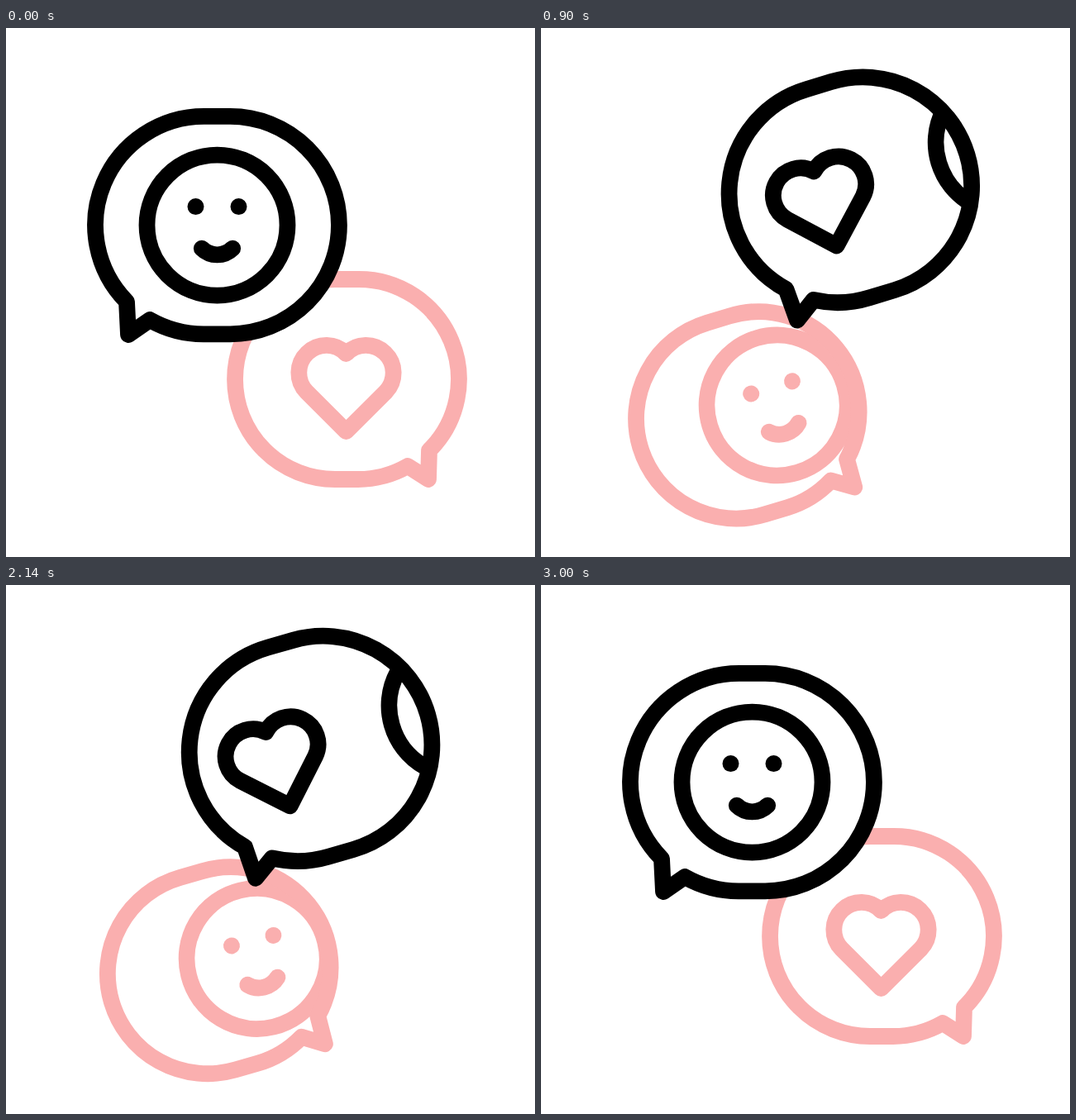
Recreate the animation shown at these times as an HTML page. Size 640 px wide and 640 px high, loop 3020 ms.

```html
<!DOCTYPE html>
<html lang="en">
<head>
<meta charset="utf-8">
<title>Chat bubbles</title>
<style>
  html, body { margin: 0; width: 100%; height: 100%; overflow: hidden; background: #fff; }
  svg { display: block; width: 100%; height: 100%; }
</style>
</head>
<body>
<svg id="stage" viewBox="0 0 640 640"></svg>
<script>
const LOOP = 3020, MOVE = 1200, RETURN_AT = 1800, TILT = -20;

const HEART = 'M0 52 L-47.8 4.3 A33 33 0 1 1 0 -42 A33 33 0 1 1 47.8 4.3 Z';

const heart = `<path d="${HEART}"/>`;
const face = `<circle r="85"/>
  <g fill="currentColor" stroke="none">
    <circle cx="-26" cy="-22.5" r="10"/><circle cx="26" cy="-22.5" r="10"/>
  </g>
  <path d="M-18.7 28 A26.6 26.6 0 0 0 18.7 28"/>`;

// Two half circles joined by short straight edges, with a tail at the lower left
function bubblePath(r, half, neckA, neckB, tip) {
  const arc = `A${r} ${r} 0 0 1`;
  return `M${neckA} ${arc} ${-half} ${-r} H${half} ${arc} ${half} ${r}
    H${-half} ${arc} ${neckB} L${tip} Z`;
}

// first: content that rides with the bubble; second: content that slides in and rocks
const bubbles = [
  {
    id: 'back', color: '#faafaf', flip: -1,
    path: bubblePath(121, 14, [-100, 86], [-74, 105], [-99, 121]),
    from: [412, 425], to: [219.5, 476.5], slide: -252,
    first: { art: heart, x: -0.5, y: 11 },
    second: { art: face, x: 251, y: -1, rock: 10, drop: 0 }
  },
  {
    id: 'front', color: '#000', flip: 1,
    path: bubblePath(131.7, 15.75, [-109.5, 92.5], [-81.5, 114.5], [-107.5, 132.5]),
    from: [255.5, 238.6], to: [396.2, 187.8], slide: 233,
    first: { art: face, x: 0, y: 0 },
    second: { art: heart, x: -232.5, y: 4, rock: -10, drop: 4 }
  }
];

const stage = document.getElementById('stage');
stage.innerHTML = bubbles.map(b => `
  <g id="${b.id}" color="${b.color}" fill="none" stroke="currentColor" stroke-width="19.8"
     stroke-linecap="round" stroke-linejoin="round">
    <clipPath id="${b.id}-clip"><path d="${b.path}" transform="scale(${b.flip} 1)"/></clipPath>
    <path d="${b.path}" transform="scale(${b.flip} 1)" fill="#fff" stroke="none"/>
    <g clip-path="url(#${b.id}-clip)">
      <g class="first">${b.first.art}</g>
      <g class="second"><g transform="translate(0 ${b.second.drop})">${b.second.art}</g></g>
    </g>
    <path d="${b.path}" transform="scale(${b.flip} 1)"/>
  </g>`).join('');

for (const b of bubbles) {
  b.node = document.getElementById(b.id);
  b.first.node = b.node.querySelector('.first');
  b.second.node = b.node.querySelector('.second');
}

const smooth = x => {
  const u = Math.min(1, Math.max(0, x));
  return u * u * (3 - 2 * u);
};
const lerp = (a, b, p) => a + (b - a) * p;
const place = (node, x, y, angle = 0) =>
  node.setAttribute('transform', `translate(${x} ${y}) rotate(${angle})`);

function draw(t) {
  const p = smooth(t / MOVE) - smooth((t - RETURN_AT) / MOVE);
  const swing = Math.cos(t / MOVE * 2 * Math.PI);
  for (const { node, from, to, slide, first, second } of bubbles) {
    place(node, lerp(from[0], to[0], p), lerp(from[1], to[1], p), TILT * p);
    place(first.node, first.x + slide * p, first.y);
    place(second.node, second.x + slide * p, second.y, second.rock * swing);
  }
}

const start = performance.now();
function tick() {
  draw((performance.now() - start) % LOOP);
  requestAnimationFrame(tick);
}
tick();
</script>
</body>
</html>
```
